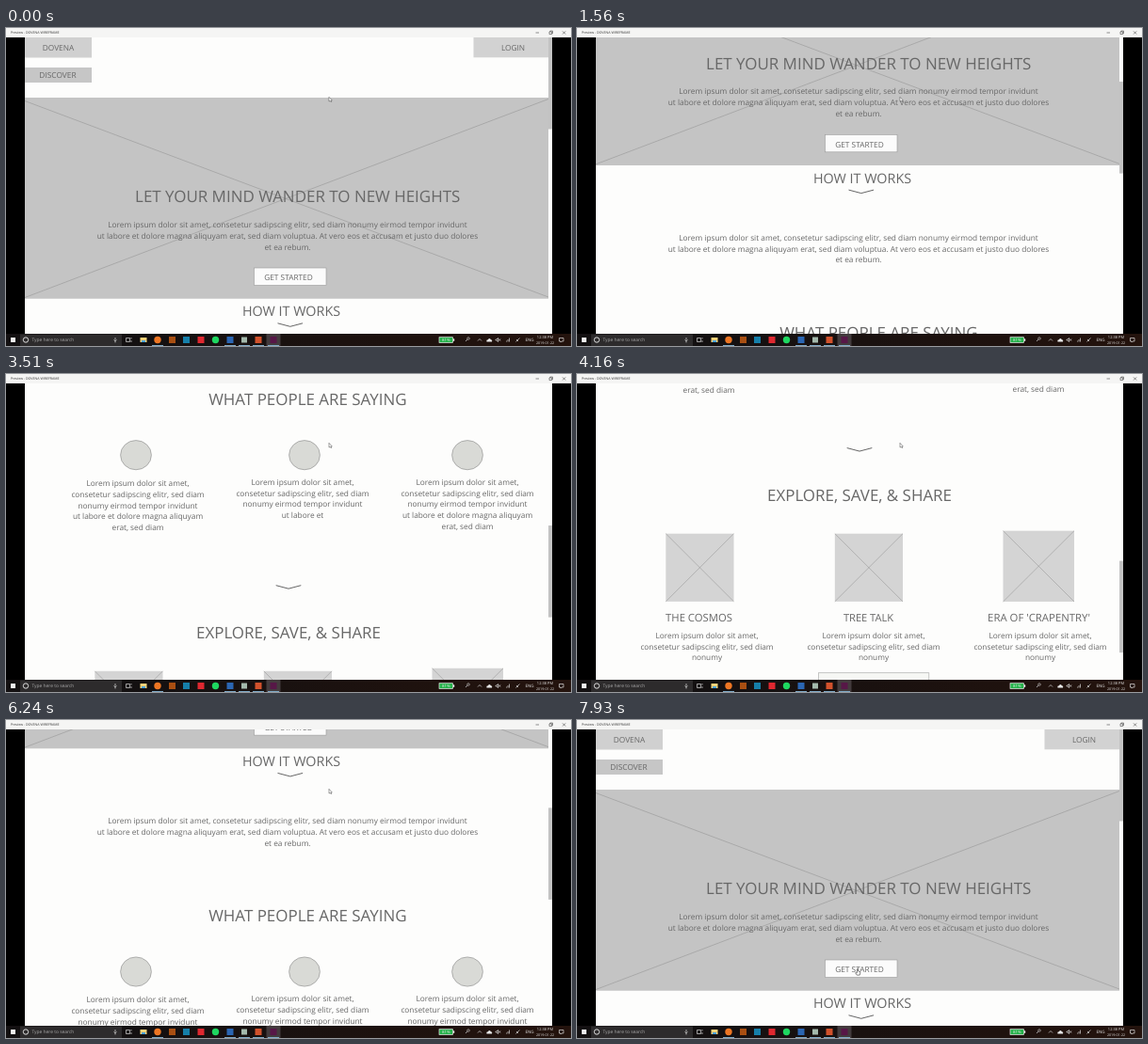
Animation, 600 px wide and 338 px high, one loop 8 s. Source, as an HTML page:

```html
<!DOCTYPE html>
<html lang="en">
<head>
<meta charset="utf-8">
<title>Wireframe preview</title>
<style>
  html, body { margin: 0; width: 100%; height: 100%; overflow: hidden; background: #000; }
  svg { display: block; width: 600px; height: 338px; }
  text { font-family: "Open Sans", "Noto Sans", sans-serif; text-rendering: geometricPrecision; }
  #page text { fill: #676767; text-anchor: middle; }
  .thin { fill: none; stroke: #8c8c8c; stroke-width: .5; }
  .chevron { fill: none; stroke: #666; stroke-width: 1; }
  .tray { fill: none; stroke: #ddd; stroke-width: .7; }
</style>
</head>
<body>
<svg viewBox="0 0 600 338">
  <linearGradient id="bar">
    <stop offset=".2" stop-color="#131011"/>
    <stop offset="1" stop-color="#24130d"/>
  </linearGradient>
  <rect width="600" height="338"/>
  <rect x="20" y="10" width="560" height="315" fill="#fdfdfc"/>
  <g id="page"></g>
  <rect id="thumb" x="576" width="4" height="97.5" fill="#c3c3c3"/>
  <g id="chrome"></g>
  <path id="arrow" d="M0 0V4.8L1.2 3.9L2 5.4L2.7 5L2.1 3.7H3.3Z" fill="#fff" stroke="#444" stroke-width=".5"/>
  <path id="hand" d="M-.6 -2.8Q0 -3.6 .6 -2.8V-.6L2.5 0Q3 .3 2.8 1.5L2.2 3.6H-.8L-2.3 1.2Q-2 .4 -.6 1.2Z" fill="#fff" stroke="#333" stroke-width=".6"/>
</svg>
<script>
const $ = id => document.getElementById(id);
const LOOP = 8000, BODY = 8.3;

const rect = (x, y, w, h, fill, extra = "") =>
  `<rect x="${x}" y="${y}" width="${w}" height="${h}" fill="${fill}" ${extra}/>`;
const text = (s, x, y, size, extra = "") =>
  `<text x="${x}" y="${y}" font-size="${size}" ${extra}>${s}</text>`;
const lines = (list, x, y, step = 11.8) =>
  list.map((s, i) => text(s, x, y + i * step, BODY)).join("");
const path = (d, cls) => `<path d="${d}" class="${cls}"/>`;
const dot = (x, r, fill) => `<circle cx="${x}" cy="331.5" r="${r}" fill="${fill}"/>`;
const tile = (x, fill, w = 7) => rect(x - w / 2, 331.5 - w / 2, w, w, fill);
const chevron = (x, y) => path(`M${x - 13.3} ${y}L${x} ${y + 3.5}L${x + 13.3} ${y}`, "chevron");
const crossed = (x, y, w, h) => rect(x, y, w, h, "#d4d4d4") +
  path(`M${x} ${y}l${w} ${h}m0 ${-h}l${-w} ${h}`, "thin");

const lorem = [
  "Lorem ipsum dolor sit amet, consetetur sadipscing elitr, sed diam nonumy eirmod tempor invidunt",
  "ut labore et dolore magna aliquyam erat, sed diam voluptua. At vero eos et accusam et justo duo dolores",
  "et ea rebum."
];
const start = ["Lorem ipsum dolor sit amet,", "consetetur sadipscing elitr, sed diam"];
const quote = [...start, "nonumy eirmod tempor invidunt", "ut labore et dolore magna aliquyam", "erat, sed diam"];
const shortQuote = [...quote.slice(0, 3), "ut labore et"];
const blurb = [...start, "nonumy"];

$("page").innerHTML =
  // Navigation and hero
  rect(20, 10, 71, 21.5, "#d0d0d0") + text("DOVENA", 55.5, 24.2, 8.3) +
  rect(20, 42, 71, 16, "#c6c6c6") + text("DISCOVER", 55, 52.6, 8.4) +
  rect(496.5, 10, 79.5, 21.3, "#d2d2d2") + text("LOGIN", 538.5, 24.2, 8.3) +
  rect(20, 74, 556, 213.7, "#c4c4c4") +
  path("M20 77.5L576 286M576 75.5L20 286.5", "thin") +
  text("LET YOUR MIND WANDER TO NEW HEIGHTS", 309.7, 185.2, 16.95) +
  lines(lorem, 299, 212) +
  rect(263.5, 255, 76.5, 18.5, "#fbfbfb", 'stroke="#999" stroke-width=".6"') +
  text("GET STARTED", 300, 268.2, 8.3) +
  // How it works
  text("HOW IT WORKS", 303, 306.3, 14.35) + chevron(301.8, 313.8) +
  lines(lorem, 299, 367.4) +
  // Quotes
  text("WHAT PEOPLE ARE SAYING", 320.4, 471.7, 16.95) +
  [138, 317, 490].map(x =>
    `<ellipse cx="${x}" cy="524.9" rx="16.4" ry="15.6" fill="#d9dad6" stroke="#888" stroke-width=".6"/>`).join("") +
  lines(quote, 140, 557.7) + lines(shortQuote, 315, 556.6) + lines(quote, 490, 556.6) +
  chevron(300, 663.4) +
  // Explore
  text("EXPLORE, SAVE, &amp; SHARE", 300, 719.6, 16.95) +
  crossed(94.3, 754.5, 72.2, 72.2) + crossed(273.8, 754.5, 72.2, 72.2) + crossed(452.5, 751.5, 75.5, 75.3) +
  text("THE COSMOS", 129.5, 848, 11.3) +
  text("TREE TALK", 309.5, 848, 11.1) +
  text("ERA OF 'CRAPENTRY'", 490.5, 848, 11.35) +
  [138, 315, 492].map(x => lines(blurb, x, 866, 11.6)).join("") +
  rect(256.5, 902.5, 117.3, 23.8, "#f6f7f4", 'stroke="#b0b0b0" stroke-width=".7"') +
  text("SEE MORE", 312, 919, 11.3) +
  // Footer
  rect(20, 959.7, 556, .8, "#cfcfcf") +
  text("CONTACT", 303, 975.2, 10.2) +
  text("EMAIL / PERIVAL / MONTAVRIL", 303, 990.5, 8.75);

const light = 'fill="#e8e8e8"', center = 'text-anchor="middle"';
$("chrome").innerHTML =
  rect(0, 0, 600, 10, "#f5f5f4") +
  text("Preview - DOVENA WIREFRAME", 5, 6.3, 3.6, 'fill="#333"') +
  `<path d="M562.5 5h3.5M577 4h2.6v2.6h-2.6zM577.9 4v-.9h2.6v2.6h-.9M591 3.4l3.2 3.2m0-3.2l-3.2 3.2" fill="none" stroke="#444" stroke-width=".6"/>` +
  // Taskbar
  rect(0, 325, 600, 13, "url(#bar)") +
  rect(15, 325.5, 108, 12.5, "#2d2b2c") +
  tile(7.5, "#eee", 5) +
  `<circle cx="21" cy="331.5" r="2.7" fill="none" stroke="#eee" stroke-width=".9"/>` +
  text("Type here to search", 27.5, 333.2, 4.9, 'fill="#aaa"') +
  path("M116 329v3M114.5 331.5q1.5 3 3 0M116 333v1.5", "tray") +
  path("M127.5 329.5h4v4h-4zM133 329v1.5M133 332v2", "tray") +
  rect(142.5, 329, 7, 5, "#f1d37b") + rect(144, 332, 4, 2, "#4ba3d8") +
  dot(161, 3.7, "#ee7623") +
  tile(176.5, "#a94f12") + tile(191.5, "#167fa9") + tile(207, "#df2830") +
  dot(222.5, 3.7, "#1ed760") +
  tile(238, "#2b66b3") + tile(253, "#a4b9ac", 6) + tile(268, "#d2522c") +
  rect(276.5, 325, 15, 13, "#433b3d") + tile(284, "#571747") +
  [161, 238, 253, 268, 284].map(x => rect(x - 6, 337, 12, 1, "#7fa9c6")).join("") +
  rect(460, 328.7, 14.5, 5.7, "#25b34b", 'stroke="#eee" stroke-width=".7"') +
  rect(475, 330.3, 1.2, 2.5, "#eee") +
  text("81%", 467.2, 333.2, 4.4, `${light} ${center}`) +
  path("M488 333l2-2m-.5-1l1.5 1.5l1.5-1.5l-1.5-1.5zM501 332.5l2-2l2 2", "tray") +
  `<path d="M510.5 333.5q-.7-2.2 1.4-2.2q1.4-2.5 3 0q2 .2 1 2.2z" ${light}/>` +
  path("M520 331h1l1.5-1.5v4l-1.5-1.5h-1zM523.5 330.5l1.5 2m0-2l-1.5 2M531.5 333.5v-1M533 333.5v-2.5M534.5 333.5v-4M541.5 333.5l4-4M542 331l2 2", "tray") +
  text("ENG", 556, 333.3, 4.5, `${light} ${center}`) +
  text("12:38 PM", 572.5, 330.3, 4, `${light} ${center}`) +
  text("2019-01-22", 572.5, 336.2, 3.7, `${light} ${center}`) +
  path("M587.5 329.5h4.5v3.5h-2l-1 1v-1h-1.5z", "tray");

// [time, page scroll, scrollbar offset]
const scrollKeys = [
  [0, 0, 0], [620, 0, 0], [1560, 141.5, 47], [2340, 279.5, 90], [3510, 438.5, 151],
  [4600, 683.5, 214], [5400, 683.5, 214], [6240, 257.8, 83.5], [6850, 0, 0], [LOOP, 0, 0]
];
// [time, x, y]
const mouseKeys = [[0, 343, 73.3], [6750, 343, 73.3], [7380, 298, 267.5], [LOOP, 298, 267.5]];

function sample(keys, t) {
  const i = keys.findIndex(k => k[0] > t);
  const a = keys[i - 1], b = keys[i];
  const p = (t - a[0]) / (b[0] - a[0]);
  return [1, 2].map(n => a[n] + (b[n] - a[n]) * p);
}

function draw(now) {
  const t = now % LOOP;
  const [scroll, bar] = sample(scrollKeys, t);
  const [x, y] = sample(mouseKeys, t);
  const overButton = y > 256;
  $("page").setAttribute("transform", `translate(0 ${-scroll})`);
  $("thumb").setAttribute("y", 10 + bar);
  for (const id of ["arrow", "hand"]) {
    $(id).setAttribute("transform", `translate(${x} ${y})`);
    $(id).setAttribute("visibility", (id === "hand") === overButton ? "visible" : "hidden");
  }
  requestAnimationFrame(draw);
}
requestAnimationFrame(draw);
</script>
</body>
</html>
```
